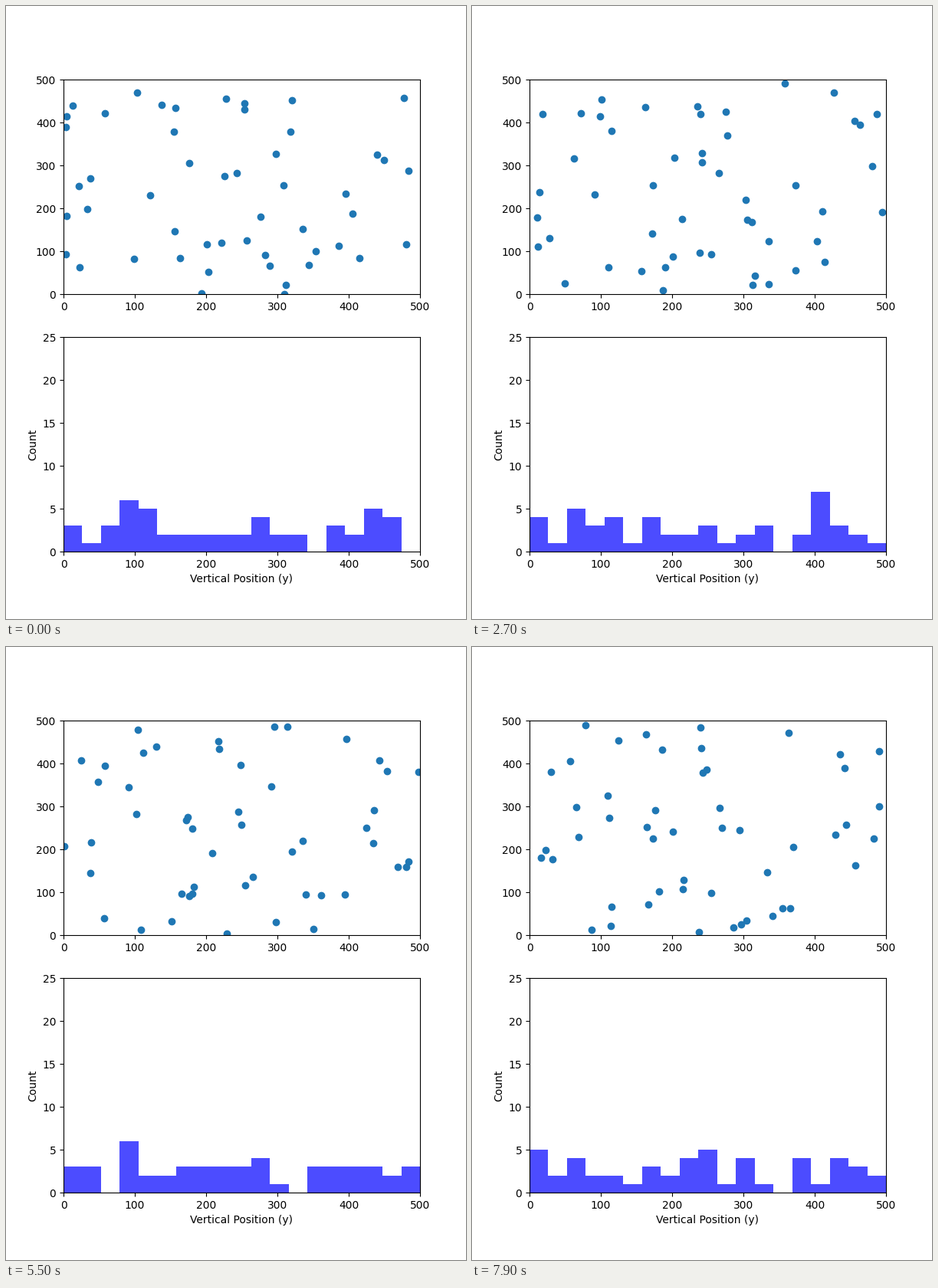
A matplotlib script for the animation above (8 s loop, 600x800 px).

```python
import numpy as np
import matplotlib.pyplot as plt
from matplotlib.animation import FuncAnimation

SIZE = 500
COUNT = 50
FRAMES = 80
STEP = 9

# Random walk in a box whose opposite edges are joined
rng = np.random.default_rng(7)
start = rng.uniform(0, SIZE, (COUNT, 2))
steps = rng.uniform(-STEP, STEP, (FRAMES, COUNT, 2))
walk = (start + steps.cumsum(axis=0)) % SIZE

fig, (box, hist) = plt.subplots(2, 1, figsize=(6, 8), dpi=100)

dots, = box.plot([], [], "o", color="tab:blue", markersize=6)
box.set(xlim=(0, SIZE), ylim=(0, SIZE))

edges = np.linspace(0, SIZE, 20)
_, _, bars = hist.hist(walk[0, :, 1], bins=edges, color="blue", alpha=0.7)
hist.set(xlim=(0, SIZE), ylim=(0, 25),
         xlabel="Vertical Position (y)", ylabel="Count")


def update(i):
    x, y = walk[i].T
    dots.set_data(x, y)
    counts, _ = np.histogram(y, bins=edges)
    for bar, count in zip(bars, counts):
        bar.set_height(count)
    return dots, *bars


anim = FuncAnimation(fig, update, frames=FRAMES, interval=100,
                     repeat=True, repeat_delay=0)
plt.show()
```
